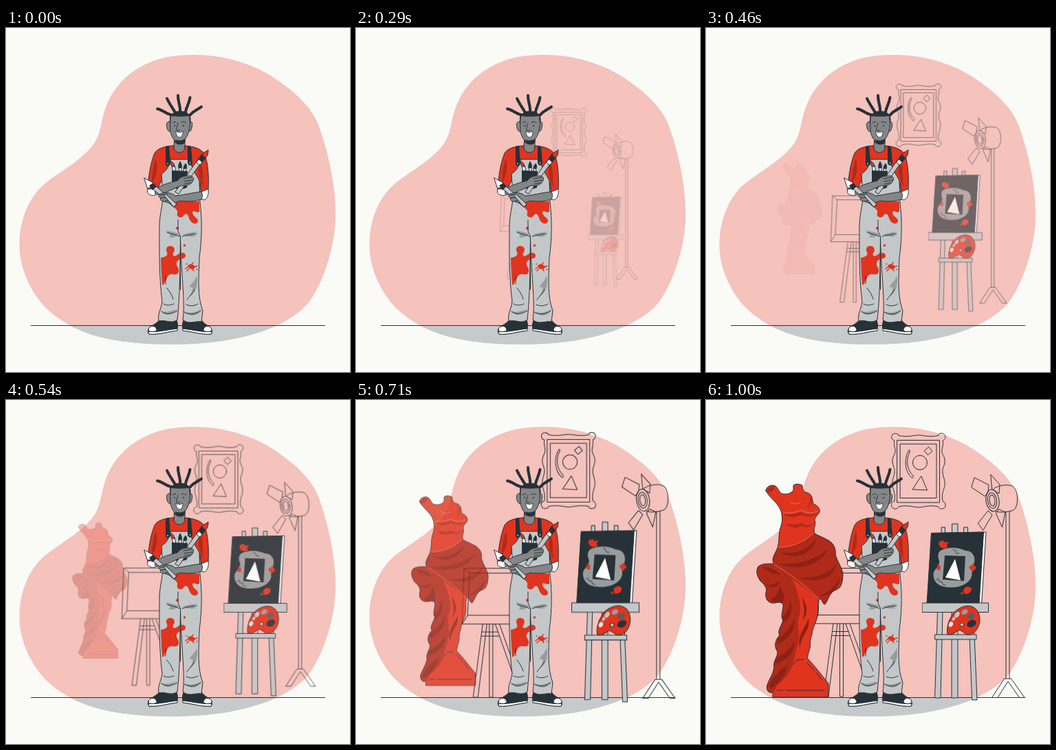
These frames come from a looping animation (500x500 px, 1040 ms). An HTML page:

```html
<!DOCTYPE html>
<html lang="en">
<head>
<meta charset="utf-8">
<title>Artist in the studio</title>
<style>
  html, body { margin: 0; width: 100%; height: 100%; overflow: hidden; background: #fafbf6; }
  svg { display: block; width: 100vw; height: 100vh; }
  .ink { stroke: #263238; stroke-width: 1; stroke-linejoin: round; stroke-linecap: round; }
  .line { fill: none; }
  .red { fill: #e0341f; }
  .deep { fill: #b02a19; }
  .shade { fill: #8f2114; }
  .dark { fill: #263238; }
  .grey { fill: #c4c7c8; }
  .fold { fill: #999c9d; }
  .skin { fill: #858687; }
  .white { fill: #fff; }
  .pop { animation: 1040ms -3ms infinite both; }
  #room { transform-origin: 310px 241px; animation-name: room; }
  #easel { transform-origin: 362px 307px; animation-name: easel; }
  #statue { transform-origin: 136.5px 277px; animation-name: statue; }

  /* 25 drawings per loop: one lasts 4% */
  @keyframes room {
    0%   { scale: .33;   opacity: 0;   animation-timing-function: steps(7); }
    28%  { scale: .65;   opacity: .32; animation-timing-function: steps(4); }
    44%  { scale: .83;   opacity: .64; animation-timing-function: steps(2); }
    52%  { scale: .914;  opacity: .8;  animation-timing-function: steps(2); }
    60%  { scale: .968;  opacity: .94; animation-timing-function: steps(2); }
    68%  { scale: 1.006; opacity: 1;   animation-timing-function: steps(3); }
    80%  { scale: 1.025; opacity: 1;   animation-timing-function: steps(1); }
    84%  { scale: 1.03;  opacity: 1;   animation-timing-function: steps(3); }
    96%, 100% { scale: 1; opacity: 1; }
  }
  @keyframes easel {
    0%   { scale: .39;   opacity: 0;   animation-timing-function: steps(1); }
    20%  { scale: .39;   opacity: 0;   animation-timing-function: steps(2); }
    28%  { scale: .535;  opacity: .21; animation-timing-function: steps(4); }
    44%  { scale: .81;   opacity: .65; animation-timing-function: steps(2); }
    52%  { scale: .953;  opacity: .88; animation-timing-function: steps(2); }
    60%  { scale: 1.008; opacity: 1;   animation-timing-function: steps(2); }
    68%  { scale: 1.02;  opacity: 1;   animation-timing-function: steps(3); }
    80%, 100% { scale: 1; opacity: 1; }
  }
  @keyframes statue {
    0%   { scale: .46;   opacity: 0;   animation-timing-function: steps(1); }
    40%  { scale: .46;   opacity: 0;   animation-timing-function: steps(1); }
    44%  { scale: .52;   opacity: .05; animation-timing-function: steps(4); }
    60%  { scale: .75;   opacity: .52; animation-timing-function: steps(2); }
    68%  { scale: .89;   opacity: .8;  animation-timing-function: steps(3); }
    80%  { scale: 1.007; opacity: 1;   animation-timing-function: steps(1); }
    84%  { scale: 1.013; opacity: 1;   animation-timing-function: steps(3); }
    96%, 100% { scale: 1; opacity: 1; }
  }
</style>
</head>
<body>
<svg viewBox="0 0 500 500">
  <defs>
    <path id="blob" d="M19.500 314C20 276 35 241 62 222C85 205 112 190 128 168C140 150 137 132 148 108C163 74 195 50 235 42C290 33 350 44 395 76C425 97 446 118 455 143C470 185 480 235 479 275C478 315 464 365 440 399C415 428 375 442 340 450C290 462 215 463 160 454C115 447 75 428 50 398C32 375 19 344 19.500 314Z"/>
    <clipPath id="inBlob"><use href="#blob"/></clipPath>
    <path id="figure" d="M87 132C87 126 95 122 101 125C105 128 106 134 110 136C116 138 124 136 127 131V124C131 121 136 122 140 124C140 130 142 134 148 135C156 138 154 146 156 151C162 153 166 158 165 163C163 167 158 170 158 175C161 180 155 188 158 194C163 197 171 200 178 204C186 209 189 216 188 224C190 233 196 240 199 252C199 260 198 267 195 272C190 277 186 276 183 280C178 285 177 292 173 297C168 297 170 288 164 289C161 296 164 304 162 314C160 324 155 330 154 341C150 350 153 357 150 364L147 375C158 386 168 400 178 412V432H97V425C90 427 87 420 89 414C92 405 98 398 99 388C97 380 104 374 104 366C98 358 101 348 107 342C103 336 110 328 112 320C107 314 113 305 112 297C107 291 103 296 96 295C89 294 86 288 87 280C90 274 84 267 79 263C74 256 72 248 76 242C82 237 92 238 99 238C94 232 100 224 104 215C107 205 105 195 108 186C111 178 112 168 108 159C103 148 93 143 87 132Z"/>
    <clipPath id="inFigure"><use href="#figure"/></clipPath>
  </defs>

  <use href="#blob" fill="#f5c2bc"/>
  <rect y="432" width="500" height="40" fill="#c7cacb" clip-path="url(#inBlob)"/>
  <path class="ink" d="M36.500 432.500H463.500"/>

  <g id="room" class="pop ink line">
    <!-- wall picture -->
    <path d="M280 51.500C293 55 302 51 309 51C316 51 325 55 338 51.500C338 47 347 47 348 53C348 57 346 58 344 59C346 66 342 70 343 76C344 81 348 83 347 91C346 97 343 99 344 106C345 114 348 116 347 124C346 131 342 135 344 147C349 149 350 157 344 158C340 159 338 157 338 155C325 152 316 156 309 156C302 156 293 152 280 155C279 159 271 160 269.500 154C269 150 271 148 274 147C276 137 272 131 271 124C270 116 273 113 274 106C275 99 272 97 271 91C270 83 274 81 275 76C276 70 272 66 274 59C269 58 268 51 273 49C277 48 279 49 280 51.500Z"/>
    <path d="M278 58.500H339.500V149H278ZM282.500 64H335V142.500H282.500Z"/>
    <circle cx="311" cy="91" r="10.500"/>
    <path d="M324 68.500L329 74.500L322.500 80L317.500 74ZM313 111L321.500 131L300.500 130ZM295 73C287 85 289 104 299 113C301 114 302 112 301 110C292 101 290 87 296 76C297 74 296 72 295 73Z"/>

    <!-- canvas on a trestle -->
    <path d="M228 244.500H158L155 325H228M228 251.500H166L163 312.500H228M158 244.500L166 251.500M155 325L163 312.500"/>
    <path d="M185 325L171 431H178L191 325M194.500 325V431H199.500V325M203 325L230 402M209 325L232 390M184 336.500H207M183 342.500H209"/>

    <!-- studio lamp -->
    <path d="M418 129C424 124 438 122 445 125C455 130 455 157 446 160.500C438 163 428 164 421 162"/>
    <path d="M390.500 113L411 123.500L410 134L405.500 140L386 127ZM414 108.500L427 123L426 136L416 130ZM395.500 179L410 161L416 167L403 189ZM426 159L435 163L430.500 185L421.500 165Z"/>
    <g transform="rotate(-8 416.500 146)">
      <ellipse cx="416.500" cy="146" rx="9.500" ry="16"/>
      <ellipse cx="416" cy="146" rx="6.500" ry="11.500"/>
      <ellipse cx="416" cy="146" rx="4" ry="8"/>
    </g>
    <path d="M436 162V405M441 162V405M434 405H443.500L463 432.500H455.500L439 409L424 432.500H416Z"/>
  </g>

  <g id="easel" class="pop ink">
    <path class="grey" d="M358 180H366V196H358ZM342.500 185H347.500V196H342.500ZM375 185H380.500V196H375Z"/>
    <path class="grey" d="M337 306H344L341 433H333ZM357.500 306H366V433H357.500ZM382 306H388.500L394 436H387Z"/>
    <path class="white" d="M328 193.500L407 192L400.500 297H322Z"/>
    <path class="dark" d="M328 193.500L403.500 192L397 297L321.500 295Z"/>
    <g stroke="none">
      <path class="fold" d="M345 217C357 213 369 215 377 219C390 219 394 233 387 243C384 249 390 254 383 262C374 273 355 274 344 271C333 268 329 258 331 250C334 244 340 241 339 234C336 226 337 219 345 217Z"/>
      <path class="dark" d="M347 226L377 227L375 263L344 261Z"/>
      <path class="white" d="M362 231L370 262L348 258Z"/>
      <path class="red" d="M339 206L344 204L347 207L353 206L350 210L351 214L346 216L341 214L338 210ZM388 238L393 244L387 250L382 243ZM337 238L341 242L340 248L335 246ZM374 277C376 270 383 270 386 274C386 280 379 284 375 281Z"/>
      <circle class="red" cx="372" cy="281" r="1.700"/>
    </g>
    <path class="line" stroke-width=".8" d="M335 261L338 260L339 264L343 264L344 268L348 269M359 217L363 219L364 223L368 223"/>
    <path class="grey" d="M314.500 295H410.500V308.500H314.500ZM333 341H393V348H333Z"/>
    <path class="red" d="M351 340C349 333 352 321 358 312C365 302 378 297 386 300C396 303 400 315 397 326C394 337 386 342 379 341C374 339 372 334 367 335C362 337 359 343 351 340Z"/>
    <g stroke="none">
      <ellipse cx="356" cy="326" rx="3" ry="4" fill="#e4e5e5" transform="rotate(25 356 326)"/>
      <ellipse class="grey" cx="365" cy="312" rx="3" ry="4.500" transform="rotate(35 365 312)"/>
      <ellipse class="fold" cx="376" cy="308" rx="5" ry="3.500" transform="rotate(-30 376 308)"/>
      <ellipse cx="385" cy="314" rx="5.500" ry="4" fill="#555d61" transform="rotate(-35 385 314)"/>
      <ellipse class="dark" cx="386" cy="325" rx="7" ry="5" transform="rotate(-25 386 325)"/>
      <ellipse class="grey" cx="360" cy="318" rx="2" ry="3" transform="rotate(30 360 318)"/>
    </g>
    <circle class="grey" cx="372" cy="326.500" r="2.700"/>
  </g>

  <g id="statue" class="pop">
    <use href="#figure" class="red"/>
    <g clip-path="url(#inFigure)">
      <!-- cloth falling on the left -->
      <path class="deep" d="M70 236H98C116 249 130 262 133 280C137 293 139 304 135 316C131 330 138 340 134 352C132 364 129 372 126 384C123 397 112 408 104 414L96 428H80Z"/>
      <path class="shade" d="M81 243C92 243 101 246 108 254C97 253 89 249 81 243ZM86 268C94 270 101 268 106 263C108 272 97 276 86 268ZM93 291C101 287 105 280 107 271C115 279 114 291 110 299ZM110 316C118 310 121 302 122 291C128 306 121 321 110 325ZM104 347C116 338 124 330 128 317C132 334 118 349 104 355ZM103 374C116 368 124 360 129 350C130 368 116 379 100 384ZM92 415C98 401 106 394 119 385C116 401 106 412 94 420Z"/>
      <path class="shade" d="M139 286C147 297 150 309 140 321C144 311 143 300 139 286ZM149 318C152 335 138 341 137 360C131 345 143 333 149 318Z"/>
      <!-- wrap round the hips -->
      <path class="deep" d="M104 214C124 215 145 205 157 193L182 200L204 255L172 302L164 289C150 277 131 264 117 255C108 249 98 244 92 236Z"/>
      <path class="shade" d="M107 221C127 226 150 217 160 202C157 221 132 235 107 221ZM105 238C128 240 156 235 178 216C168 238 137 251 105 238ZM134 258C158 260 178 253 189 239C187 259 160 268 134 258ZM164 285C176 281 187 272 194 259C193 275 180 285 164 285Z"/>
      <!-- torso -->
      <path class="deep" d="M112 165C121 168 131 165 138 163C147 168 156 167 163 164C157 170 147 171 139 167C130 171 119 172 112 165ZM115 181C125 179 132 183 139 179C146 184 152 182 158 179C150 186 144 186 139 183C131 188 123 185 115 181ZM152 138C155 146 154 152 147 157C151 150 152 145 152 138Z"/>
      <path class="line" stroke="#ee8578" stroke-width=".7" d="M104 214C124 215 145 205 157 193M99 239C116 249 146 270 164 289M112 163C121 166 131 163 138 160C147 165 156 165 163 161M121 147C126 152 133 152 138 148"/>
      <ellipse class="deep" cx="94" cy="130" rx="6.500" ry="3.500" transform="rotate(-35 94 130)"/>
    </g>
    <use href="#figure" class="ink line"/>
    <path class="ink line" stroke-width=".8" d="M103 422H112M116 422H172M126 385L132 378L142 377M147 382L157 393M160 396L168 406"/>
  </g>

  <g id="artist">
    <!-- dreadlocks -->
    <g class="line" stroke="#263238" stroke-linecap="round">
      <path id="locks" stroke-width="4" d="M240 126C233 125 228 119 220 117.500M246 123C242 116 238 111 234 102.500M253 122C254 114 250 108 250 98M261 122C262 115 266 110 267.500 101M268 126C273 120 278 119 284 114.500"/>
      <use href="#locks" stroke-dasharray="0 5" style="stroke-width:6"/>
    </g>

    <!-- shoes -->
    <g class="ink">
      <path class="dark" d="M224 422C222 428 214 431 209 435C205 438 206 443 208 445C222 446 232 442 248 440C251 433 249 427 247 422Z"/>
      <path class="white" d="M207 441C218 443 232 439 249 437V440C235 441 224 446 208 445ZM210 434C215 432 219 435 219 440C214 442 211 442 207 440C207 437 208 435 210 434Z"/>
      <path class="dark" d="M283 422C285 428 291 431 297 435C300 438 300 443 298 445C284 446 274 442 258 440C255 433 257 427 259 422Z"/>
      <path class="white" d="M299 441C288 443 274 439 257 437V440C271 441 282 446 298 445ZM296 434C291 432 287 435 287 440C292 442 295 442 299 440C299 437 298 435 296 434Z"/>
    </g>

    <!-- neck and shirt -->
    <path class="ink skin" d="M245 160H260V174C266 185 241 187 244 174Z"/>
    <path class="ink red" d="M243 171C230 172 220 175 216 182C210 196 207 216 206 235L219 236L229 216V247H282V225L284 238L294 235C295 217 294 197 289 184C284 175 272 172 260 171C261 184 244 185 243 171Z"/>
    <path class="deep" d="M218 190C213 203 213 216 211 228C217 218 222 207 218 190ZM282 194C278 207 281 221 287 231C285 216 288 206 282 194Z"/>

    <!-- dungarees -->
    <path class="ink grey" d="M239 191H268C269 205 277 213 281 222L282 253C285 279 285 305 281 334C280 364 278 390 286 411L284 427C276 425 266 432 257 424C261 401 254 351 253.500 304C253 350 253 389 249 424C240 431 231 423 222 426C220 414 226 409 227 397C222 359 223 315 223 286C224 266 228 259 228 242L226 212C234 207 237 201 239 191Z"/>
    <path class="fold" d="M232 294C240 296 246 297 252 299C246 305 242 305 236 304C241 302 237 298 232 294ZM278 296C270 297 264 298 257 300C263 304 271 304 277 302C270 301 273 299 278 296ZM277 360C275 369 267 372 267 377C275 374 271 384 266 390C276 386 280 372 277 360ZM225 411C233 415 240 411 249 409C242 416 232 421 225 411ZM260 412C269 416 277 412 284 409C278 418 269 422 260 412Z"/>
    <path class="red" d="M241 252C254 250 267 253 281 252V267C277 270 272 263 271 268C271 274 280 276 279 281C276 288 268 283 266 276C264 269 260 269 258 273C254 278 247 274 249 269C251 263 241 262 241 252Z"/>
    <path class="red" d="M225 334C231 333 236 331 234 326C231 320 235 316 240 317C246 318 246 324 243 327C241 332 246 333 250 329C255 325 262 327 261 332C259 337 253 334 249 339C245 345 252 347 251 354C249 361 243 357 239 358C233 360 235 365 231 368C230 371 230 374 227 373C226 360 225 347 225 334Z"/>
    <path class="red" d="M264 346C267 341 273 344 275 347C274 352 267 352 264 346Z"/>
    <path class="line" stroke="#e0341f" stroke-width="1.500" stroke-linecap="round" d="M261 350L265 347M270 344L272 341M274 347L278 346M271 350L273 353M266 350L263 353M262 343L263 343M277 351L278 351"/>
    <g class="red"><circle cx="249" cy="291" r="2"/><circle cx="259.500" cy="316" r="1.800"/><circle cx="257" cy="331" r="3"/></g>
    <path class="ink line" d="M250 279V294C250 298 253 299 253.500 304V380M234 297C241 300 247 300 252 303M277 299C269 300 262 301 256 303M232 361V372M234 378C238 383 241 387 243 394M274 380C270 388 266 390 263 395M229 401C234 404 239 403 244 401M226 412C234 418 242 415 249 411M262 402C268 405 274 404 279 401M259 413C267 418 277 416 283 411"/>

    <!-- straps and pocket -->
    <path class="dark" d="M232 172L237 171L239 196C239 202 232 202 232 197ZM264 171L269 173L271 196C270 201 265 201 264 196Z"/>
    <g fill="#c4c7c8"><circle cx="235" cy="197" r="1"/><circle cx="267.500" cy="196" r="1"/></g>
    <path class="ink white" d="M243 209L241 200H245L247 209ZM252 209L251 202H255V209ZM258 209L259 203H262L261 209Z"/>
    <path class="ink red" d="M241 201C239 197 239 195 239 193C243 195 245 198 245 201Z"/>
    <path class="ink dark" d="M251 203C250 199 252 197 253 194C255 197 256 200 255 203ZM258 204C258 200 260 199 261 197C263 200 263 202 262 204Z"/>
    <path class="dark" d="M241 207L264 208L263 232C256 235 247 235 241 231Z"/>

    <!-- crossed arms with brushes -->
    <path class="ink white" d="M206 234L218 234L217 243C213 244 208 243 206 240Z"/>
    <path class="ink grey" d="M246 238L279 191L284 195L251 241Z"/>
    <path class="ink white" d="M277 195L281 190L286 194L282 199Z"/>
    <path class="ink dark" d="M280 190L285 183L291 188L285 195Z"/>
    <path class="ink red" d="M285 184C287 180 291 180 294 177C294 183 293 186 290 189Z"/>
    <path class="ink skin" d="M217 234C228 227 241 224 249 222C255 214 262 215 269 215C274 217 273 221 270 225C266 229 260 230 255 229C244 233 231 241 219 242C216 241 216 237 217 234Z"/>
    <path class="ink line" stroke-width=".8" d="M258 219L270 217M259 223L271 221M259 227L268 225"/>
    <path class="ink white" d="M284 238L294 234C295 241 293 248 288 250L282 248Z"/>
    <path class="ink grey" d="M213 233L217 229L248 257L244 260Z"/>
    <path class="ink white" d="M201 218L214 225L210 232L206 233Z"/>
    <path class="dark" d="M208 229L214 225L219 230L213 236Z"/>
    <path class="ink skin" d="M284 238C271 239 258 243 246 244C239 238 231 239 224 241C220 243 222 246 225 247C223 250 227 253 231 252C237 256 246 255 253 251C265 253 276 252 284 249C286 245 286 241 284 238Z"/>
    <path class="ink line" stroke-width=".8" d="M225 247L236 246M231 252L240 249M224 243L234 242"/>
    <path class="ink grey" d="M229 242L233 242L248 256L244 260Z"/>

    <!-- head -->
    <path class="dark" d="M244 161H261L260 167C255 171 249 170 245 166Z"/>
    <g class="ink">
      <path class="skin" d="M240 137C235 134 232 138 234 145C235 150 238 152 241 150ZM266 137C270 134 272 138 270 145C269 150 267 151 265 150Z"/>
      <path class="skin" d="M239 127H267C268 141 267 151 262 159C258 165 255 168 252 168C246 167 240 158 239 150Z"/>
      <path class="dark" d="M238.500 138C237 128 242 121 253 121C265 121 270 128 267.500 138L266.500 127.500C257 128.500 248 128.500 239.500 127.500Z"/>
      <path class="white" stroke-width=".8" d="M247 150C250 152.500 254 152 257 150C257 156 255 159 252 159C249 158 247 155 247 150Z"/>
    </g>
    <path class="dark" d="M246 162C250 164 256 164 260 161C258 166 255 168.500 252 168.500C249 168 247 165 246 162Z"/>
    <path class="ink line" stroke-width=".8" d="M242 138C243 136 246 136 247 137M255 137C257 136 260 136 262 138M250 138C249 143 246 147 249 149C250 150 252 149 253 148"/>
    <g class="dark"><circle cx="245" cy="142" r="1.100"/><circle cx="258" cy="142" r="1.100"/></g>
  </g>
</svg>
</body>
</html>
```
